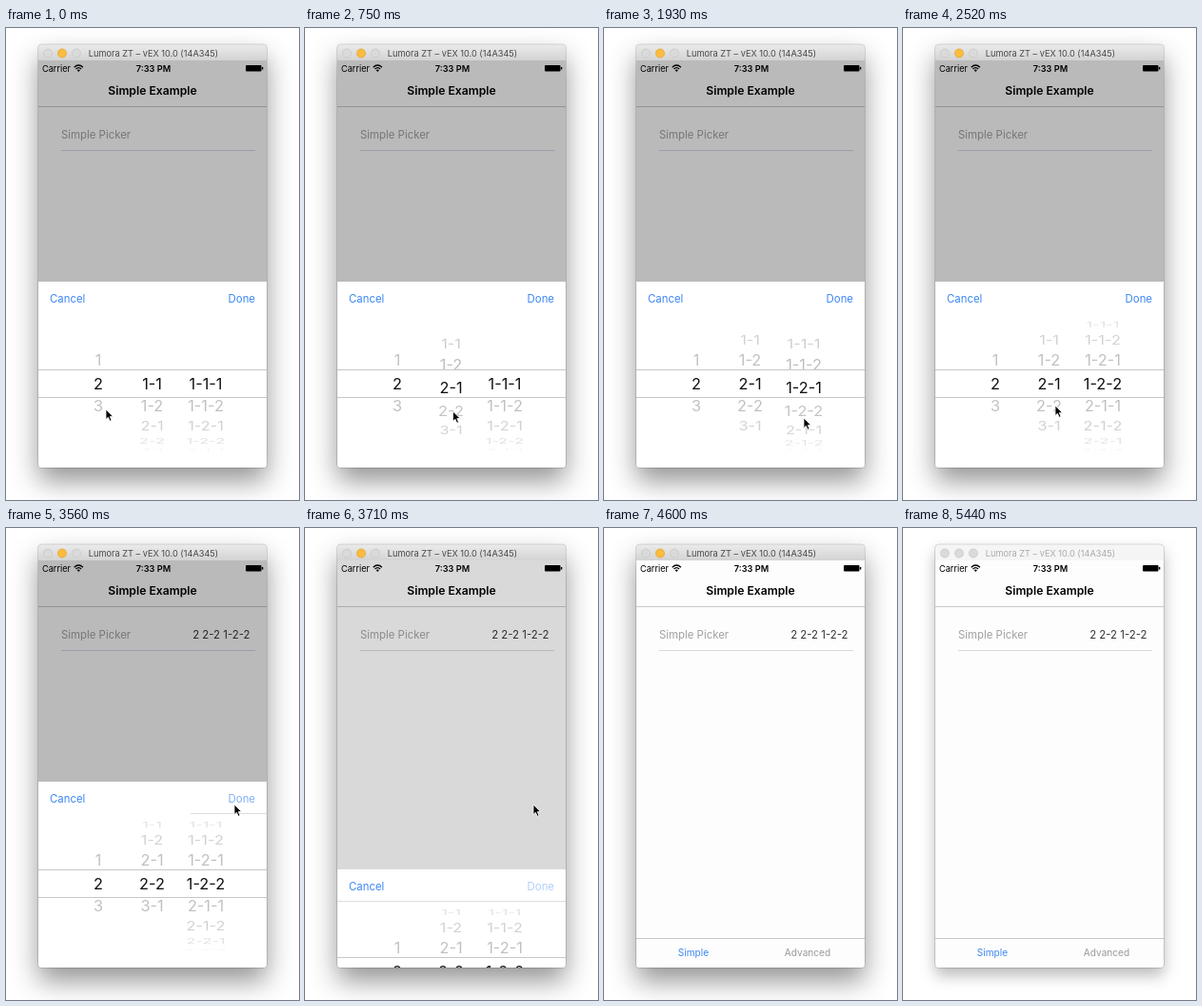
Recreate the animation shown at these times as an HTML page. Size 308 by 495 pixels, loop 5540 ms.

```html
<!DOCTYPE html>
<html>
<head>
<meta charset="utf-8">
<style>
html, body { margin: 0; width: 100%; height: 100%; overflow: hidden; background: #fff }
svg { display: block; width: 308px; height: 495px; font-family: Inter, Roboto, sans-serif }
.mid { text-anchor: middle }
.end { text-anchor: end }
.bold { font-weight: 600 }
.blue { fill: #3c87f2 }
.line { stroke: #c8c8c8 }
#frame { filter: drop-shadow(0 14px 14px rgba(0,0,0,.42)) }
#bar { fill: url(#chrome) }
#title { fill: #484848 }
#lights { fill: #dadada; stroke: #c6c6c6; stroke-width: .7 }
#amber { fill: #fcbc3e; stroke: #e0a12f }
.idle #frame { filter: drop-shadow(0 8px 8px rgba(0,0,0,.28)) }
.idle #bar { fill: #f5f5f5 }
.idle #title { fill: #aaa }
.idle #amber { fill: inherit; stroke: inherit }
</style>
</head>
<body>
<svg id="stage" viewBox="0 0 308 495">
  <defs>
    <linearGradient id="chrome" x2="0" y2="1">
      <stop stop-color="#ebebeb"/><stop offset="1" stop-color="#d3d3d3"/>
    </linearGradient>
    <clipPath id="screen"><path d="M34 34H274V459q0 2-2 2H36q-2 0-2-2z"/></clipPath>
  </defs>

  <rect id="frame" x="34" y="17" width="240" height="444" rx="4" fill="#fdfdfd"/>
  <path id="bar" d="M34 34V21q0-4 4-4H270q4 0 4 4V34z"/>
  <g id="lights">
    <circle cx="44" cy="26.5" r="4.5"/>
    <circle cx="59" cy="26.5" r="4.5" id="amber"/>
    <circle cx="74" cy="26.5" r="4.5"/>
  </g>
  <text id="title" class="mid" x="155" y="30" font-size="9.2">Lumora ZT – vEX 10.0 (14A345)</text>

  <g clip-path="url(#screen)">
    <rect x="34" y="34" width="240" height="427" fill="#fdfdfd"/>
    <g font-size="9.2">
      <text x="38" y="45.5">Carrier</text>
      <text class="mid bold" x="155" y="45.5">7:33 PM</text>
    </g>
    <g fill="none" stroke="#000" stroke-width="1.3">
      <path d="M71.7 41.2Q76.300 36.800 80.900 41.200M73.500 43Q76.300 40.300 79.100 43"/>
    </g>
    <path d="M74.700 44.200Q76.300 42.800 77.900 44.200L76.300 46z"/>
    <rect x="252" y="39" width="16.500" height="6.500" rx="1"/>
    <rect x="269" y="41" width="1.300" height="2.500"/>

    <text class="mid bold" x="154" y="70" font-size="12.2">Simple Example</text>
    <path class="line" d="M34 82.500H274M34 430.500H274"/>
    <g font-size="11.4">
      <text x="58" y="116" fill="#a0a0a4">Simple Picker</text>
      <text id="value" class="end" x="256.500" y="116" fill="#333">2 2-2 1-2-2</text>
    </g>
    <path id="rule" d="M58 128.500H262"/>
    <g font-size="10.100" class="mid">
      <text x="94" y="449" class="blue">Simple</text>
      <text x="214" y="449" fill="#999">Advanced</text>
    </g>

    <rect id="dim" x="34" y="34" width="240" height="427"/>

    <g id="sheet">
      <rect x="34" y="266" width="240" height="195" fill="#fff"/>
      <g font-size="11.400" class="blue">
        <text x="46" y="288">Cancel</text>
        <text id="done" class="end" x="262" y="288">Done</text>
      </g>
      <path id="divider" stroke="#ddd"/>
      <g id="wheels" class="mid" font-size="16.300" fill="#111"></g>
      <path class="line" d="M34 358.500H274M34 387.500H274"/>
    </g>
  </g>
  <rect x="33.500" y="17" width="241" height="444.500" rx="4" fill="none" stroke="#000" stroke-opacity=".13"/>

  <path id="cursor" d="M0 0V10.500L2.400 8.300L4.200 12.300L6 11.500L4.300 7.600H7.600z" stroke="#fff" stroke-width=".8"/>
</svg>
<script>
const LOOP = 5540, STEP = 148.4, LAST = 31;
const $ = id => document.getElementById(id);
const set = (el, attrs) => { for (const a in attrs) el.setAttribute(a, attrs[a]); };

// Keys are [step, value, ...]; values between keys are linear.
function at(keys, k, i = 1) {
  const n = keys.findIndex(p => p[0] > k);
  if (n < 0) return keys[keys.length - 1][i];
  if (n == 0) return keys[0][i];
  const a = keys[n - 1], b = keys[n];
  return a[i] + (b[i] - a[i]) * (k - a[0]) / (b[0] - a[0]);
}

const pointer = [[0, 105, 400], [2, 154, 402], [6, 156, 402], [8, 199, 409], [9, 210, 409],
  [15, 210, 409], [17, 160, 396], [20, 160, 396], [23, 240, 290], [26, 240, 290], [30, 241, 476]];
const slide = [[24, 0], [25, 92], [26, 185], [27, 195]];

const wheels = [
  { x: 97, rows: '1 2 3', pos: [[0, 1]] },
  { x: 153.5, rows: '1-1 1-2 2-1 2-2 3-1',
    pos: [[1, 0], [2, .15], [3, .6], [4, 1.3], [5, 1.8], [6, 2], [17, 2], [18, 2.2], [19, 2.7], [20, 3]] },
  { x: 210, rows: '1-1-1 1-1-2 1-2-1 1-2-2 2-1-1 2-1-2 2-2-1 2-2-2',
    pos: [[10, 0], [11, .3], [12, 1], [13, 1.8], [14, 2.5], [15, 2.9], [16, 3]] }
];
for (const w of wheels) w.rows = w.rows.split(' ').map(label => {
  const el = document.createElementNS('http://www.w3.org/2000/svg', 'text');
  el.textContent = label;
  el.setAttribute('y', 6);
  return $('wheels').appendChild(el);
});

// Rows sit on a drum of radius 70, 20.2 degrees apart.
function turn(w, k) {
  const pos = at(w.pos, k);
  w.rows.forEach((el, i) => {
    const d = i - pos, far = Math.abs(d), angle = d * 20.2 * Math.PI / 180;
    set(el, {
      transform: `translate(${w.x} ${372.5 + 70 * Math.sin(angle)}) scale(1 ${Math.max(.01, Math.cos(angle))})`,
      opacity: far > 4.3 ? 0 : far < .5 ? 1 : Math.max(.04, .33 - .07 * far)
    });
  });
}

function draw(now) {
  const t = now % LOOP;
  const k = Math.min(LAST, Math.floor((t + 10) / STEP));
  const down = at(slide, k);
  wheels.forEach(w => turn(w, k));
  set($('stage'), { class: t >= 5440 ? 'idle' : '' });
  set($('sheet'), { transform: `translate(0 ${down})` });
  set($('dim'), { opacity: .265 * (1 - down / 195) });
  set($('value'), { opacity: +(k >= 24) });
  set($('rule'), { stroke: k < 25 ? '#d4d4ea' : '#d8d8d8' });
  set($('done'), { opacity: at([[23, 1], [24, .65], [25, .4]], k) });
  set($('divider'), { d: k < 24 ? '' : `M${k < 25 ? 194 : 34} 299.5H274` });
  set($('cursor'), {
    transform: `translate(${at(pointer, k)} ${at(pointer, k, 2)})`,
    opacity: +(k < LAST)
  });
}

const start = performance.now();
function tick() {
  draw(performance.now() - start);
  requestAnimationFrame(tick);
}
tick();
</script>
</body>
</html>
```
